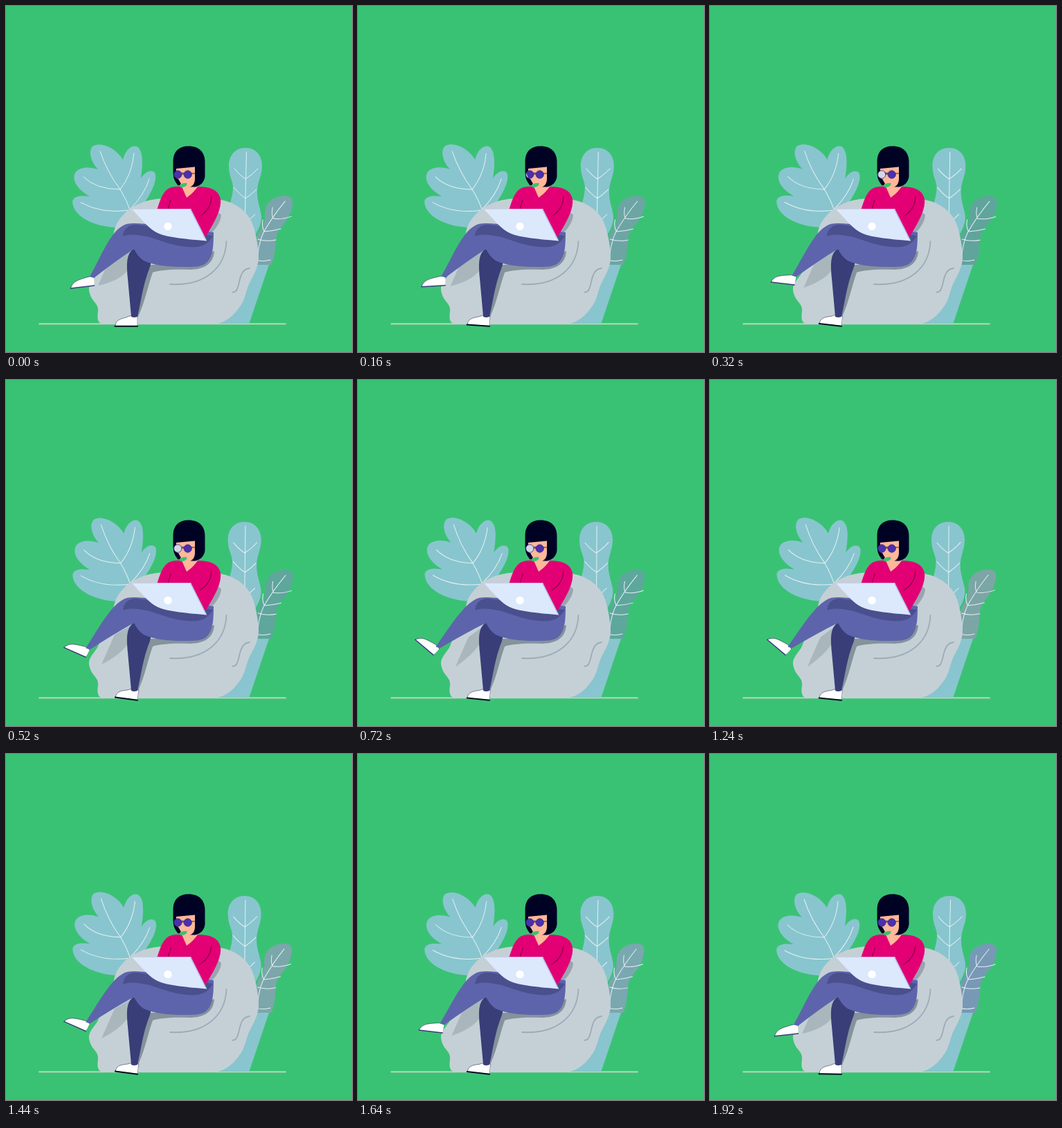
An HTML page with a canvas that plays this animation: 500 px wide and 500 px high, repeating every 1.96 s.

```html
<!DOCTYPE html>
<html lang="en">
<head>
<meta charset="utf-8">
<title>Woman with laptop on a bean bag</title>
<style>
html, body { margin: 0; width: 100%; height: 100%; overflow: hidden; background: #3ac274; }
canvas { display: block; width: 100vw; height: 100vh; }
</style>
</head>
<body>
<canvas id="stage" width="500" height="500"></canvas>
<script>
const LOOP = 1960, STEP = 40;
const ctx = document.getElementById('stage').getContext('2d');
const C = {
  bg: '#3ac274', leaf: '#89c5cf', vein: '#e4f1f3', bag: '#c5d0d6', fold: '#9dabb6',
  shade: '#84939c', soft: '#a9b7bd', leg: '#5d64ac', legDark: '#4a4f8d', legBack: '#393e78',
  top: '#e20074', topDark: '#94004c', skin: '#ffb799', hair: '#000224', lens: '#4b30ad',
  shine: '#d3d8e6', laptop: '#dce8fc', edge: '#aebce0', white: '#ffffff', sole: '#14163f'
};

const rad = d => d * Math.PI / 180;
const mix = (a, b, k) => a + (b - a) * k;

function fill(d, color) {
  ctx.fillStyle = color;
  ctx.fill(new Path2D(d));
}

function line(d, color, w) {
  ctx.strokeStyle = color;
  ctx.lineWidth = w;
  ctx.stroke(new Path2D(d));
}

function dot(x, y, r, color) {
  ctx.fillStyle = color;
  ctx.beginPath();
  ctx.arc(x, y, r, 0, 7);
  ctx.fill();
}

function turned(x, y, deg, draw) {
  ctx.save();
  ctx.translate(x, y);
  ctx.rotate(rad(deg));
  ctx.translate(-x, -y);
  draw();
  ctx.restore();
}

// keys: [time, value...]
function track(keys, t) {
  let i = 0;
  while (i < keys.length - 2 && t > keys[i + 1][0]) i++;
  const [a, b] = [keys[i], keys[i + 1]];
  const k = Math.min(1, (t - a[0]) / (b[0] - a[0]));
  return a.slice(1).map((v, n) => mix(v, b[n + 1], k));
}

const smallLeafTint = [
  [0, 122, 165, 174], [320, 95, 165, 156], [720, 94, 167, 156], [1000, 120, 175, 172],
  [1240, 124, 166, 166], [1640, 122, 168, 176], [1920, 120, 153, 182]
];
const shinePath = [[0, 228], [320, 247], [720, 249], [1000, 268], [1240, 290], [1960, 290]];

function plants(t, k) {
  fill('M358 374H380L351.5 458.5H300Z', C.leaf);

  turned(180, 300, k * 1.7, () => {
    fill('M165 320C135 321 97 307 96 283C97 274 109 274 121 275C106 267 94 253 100 241' +
      'C106 232 121 232 133 236C124 227 118 211 125 203C136 195 159 205 169 222' +
      'C172 209 181 200 189 203C200 209 197 235 195 249C200 241 209 235 215 241' +
      'C220 252 208 273 199 286L190 316Z', C.leaf);
    line('M136 210Q146 240 165 265Q175 281 180 297M112 247Q130 265 165 265' +
      'M108 284Q138 301 180 295M185 213Q182 244 165 265M207 250Q200 273 179 294', C.vein, 1);
  });

  turned(345, 345, -k * 1.2, () => {
    fill('M346 205C331 205 322 216 322 231C322 247 328 252 328 262C328 276 322 286 321 302' +
      'L330 335H357C364 326 370 314 369 303C367 290 363 282 363 269C363 254 370 246 370 231' +
      'C370 216 361 205 346 205Z', C.leaf);
    line('M347.5 211L345 320M330 235Q337 244 346 250Q357 243 364 235' +
      'M329 262Q337 272 346 278Q355 272 362 265M327 290Q335 304 345 314Q353 308 360 301', C.vein, 1);
  });

  const sway = Math.cos(2 * Math.PI * (t - 400) / LOOP);
  turned(372, 372, sway * 0.6, () => {
    const tint = track(smallLeafTint, t).map(Math.round);
    fill('M414 281C412 271 392 273 382 281C374 288 374 296 374 305C374 317 363 325 360 341' +
      'L362 374H383C392 357 387 336 394 324C401 314 414 303 414 281Z', `rgb(${tint})`);
    line('M403 282Q385 304 372 327Q364 344 363 371M385 291Q383 301 386 307Q398 309 412 304' +
      'M371 309Q369 318 373 326Q386 325 397 322M364 337Q376 341 390 338M362 367Q371 370 382 367',
      C.vein, 1);
  });
}

function bag(k) {
  fill('M134 456C130 449 135 441 132 434C129 427 122 424 120 411C119 403 125 397 129 391' +
    'C133 386 134 382 136 376L156 338C152 315 174 293 192 286C212 275 250 277 290 278' +
    'C325 278 346 293 355 312C361 326 364 345 365 359C366 376 358 388 351 402' +
    'C346 413 346 425 336 437C326 451 313 460 296 460H151C141 460 135 459 134 456Z', C.bag);
  line('M237 402C287 405 317 379 318.5 340M327 413.5C341 415 332 381 352 379', C.fold, 1.8);
  const x = mix(133, 142, k), y = mix(404, 417, k);
  fill(`M${x} ${y}L${x + 19} ${y - 43}L186 352L177 380Q166 397 ${x} ${y}Z`, C.soft);
  fill('M206 374L240 374L301 354C300 373 286 381 264 381C240 380 221 382 212 385' +
    'C205 404 202 424 191 449L184 447Z', C.shade);
  fill('M302 294L311 302C310 316 298 328 288 335L280 333Z', '#98a5af');
}

function shoe(x, y, deg) {
  ctx.save();
  ctx.translate(x, y);
  ctx.rotate(rad(deg));
  fill('M-30 15C-28 6 -18 3.5 -12 1.5C-7 0 -1 -2.5 3 0C3 4 4 9 3 12L-29 16Z', C.white);
  line('M-30.5 15.5C-28 6 -18 3.5 -12 1.5C-7 0 -1 -2.5 3 0', C.sole, 0.5);
  line('M-30.5 16L3.5 12', C.legBack, 1.5);
  ctx.restore();
}

function legs(t, k) {
  const tap = Math.abs(Math.sin(2 * Math.PI * t / LOOP));
  turned(190, 462.5, tap * 7.5, () => {
    fill('M158 462C158 453 168 451.5 174 450C178 448 183 446 190 448Q192 455 190.5 462Z', C.white);
    line('M158 462C158 453 168 451.5 174 450C178 448 183 446 190 448V462', C.sole, 0.5);
    line('M157.5 462.7H190', '#080a20', 2);
  });
  fill('M184 351C174 359 174 371 176 394L181 449Q185 451 190 449C196 422 198 402 208 377L212 361Z',
    C.legBack);

  const x = mix(124, 113.6, k), y = mix(392, 385.5, k);
  shoe(x, y, 56 * k);
  fill(`M${x - 3} ${y - 1}C${mix(137, 128, k)} ${mix(363, 361, k)} 150 328 168 318` +
    'C178 311 195 315 215 316L300 327C300 355 298 374 276 376.5C250 378 217 377 199 368' +
    `Q190 362 185 351Q${mix(159, 155, k)} ${mix(368, 365, k)} ${x + 3} ${y + 1}Z`, C.leg);
  fill('M169 333C170 321 178 315 190 316L204 318L299 332C291 346 280 350 261 348' +
    'C230 345 215 333 190 331C179 330 173 331 169 333Z', C.legDark);
}

function body() {
  fill('M254 256L275 250L278 263L262 280L252 265Z', C.skin);
  fill('M218 295C224 277 227 266 239 262Q247 260 254 261L261 277Q271 270 277 261' +
    'C292 261 307 264 310 279C312 295 299 316 288 334L268 297Z', C.top);
  line('M297 276C296 291 289 298 280 304M238 280L234 294', C.topDark, 1.3);
}

function head(t) {
  fill('M241.5 225C241.5 210 250 202.5 264 202.5C279 202.5 287.5 211 287.5 226V246' +
    'C287 254 281 260 273 261.5L252 261C245 257 241.5 250 241.5 240Z', C.hair);
  fill('M246 235L273 232.5V250C273 258 268 262 260 264L252 258Q248 254 246 246Z', C.skin);
  fill('M243 248L249 250L253 257L248 259Z', C.hair);
  fill('M250 259.5Q255 255 261.5 256Q262 260 257 261.5L252 262Z', C.bg);
  line('M246 241L273 242M254 243H258', C.hair, 0.8);

  const lenses = new Path2D();
  for (const x of [248.3, 262.7]) {
    lenses.moveTo(x + 5.7, 243.5);
    lenses.arc(x, 243.5, 5.7, 0, 7);
  }
  ctx.fillStyle = C.lens;
  ctx.fill(lenses);
  ctx.save();
  ctx.clip(lenses);
  const [c] = track(shinePath, t);
  const band = (x, w) => fill(`M${x - w - 3} 236H${x + w - 3}L${x + w + 3} 251H${x - w + 3}Z`, C.shine);
  band(c, 6.5);
  band(c - 13, 2);
  ctx.restore();
  ctx.strokeStyle = '#30217c';
  ctx.lineWidth = 0.7;
  ctx.stroke(lenses);
}

function laptop() {
  fill('M182 293.5L267 293L290 339.5C264 337 234 335 219 328C208 323 198 311 182 293.5Z', C.laptop);
  line('M266.5 293.5L289.5 339', C.edge, 1.4);
  line('M183 293.5H267', '#c3d0ee', 0.8);
  dot(234, 318.5, 5.7, C.white);
}

function draw(t) {
  const k = (1 - Math.cos(2 * Math.PI * t / LOOP)) / 2;
  ctx.lineCap = ctx.lineJoin = 'round';
  ctx.fillStyle = C.bg;
  ctx.fillRect(0, 0, 500, 500);
  line('M48 459.3H404', '#c7d9c6', 1.8);
  plants(t, k);
  bag(k);
  legs(t, k);
  body();
  head(t);
  laptop();
}

const start = performance.now();
function tick() {
  const t = (performance.now() - start) % LOOP;
  draw(Math.floor(t / STEP) * STEP);
  requestAnimationFrame(tick);
}
tick();
</script>
</body>
</html>
```
